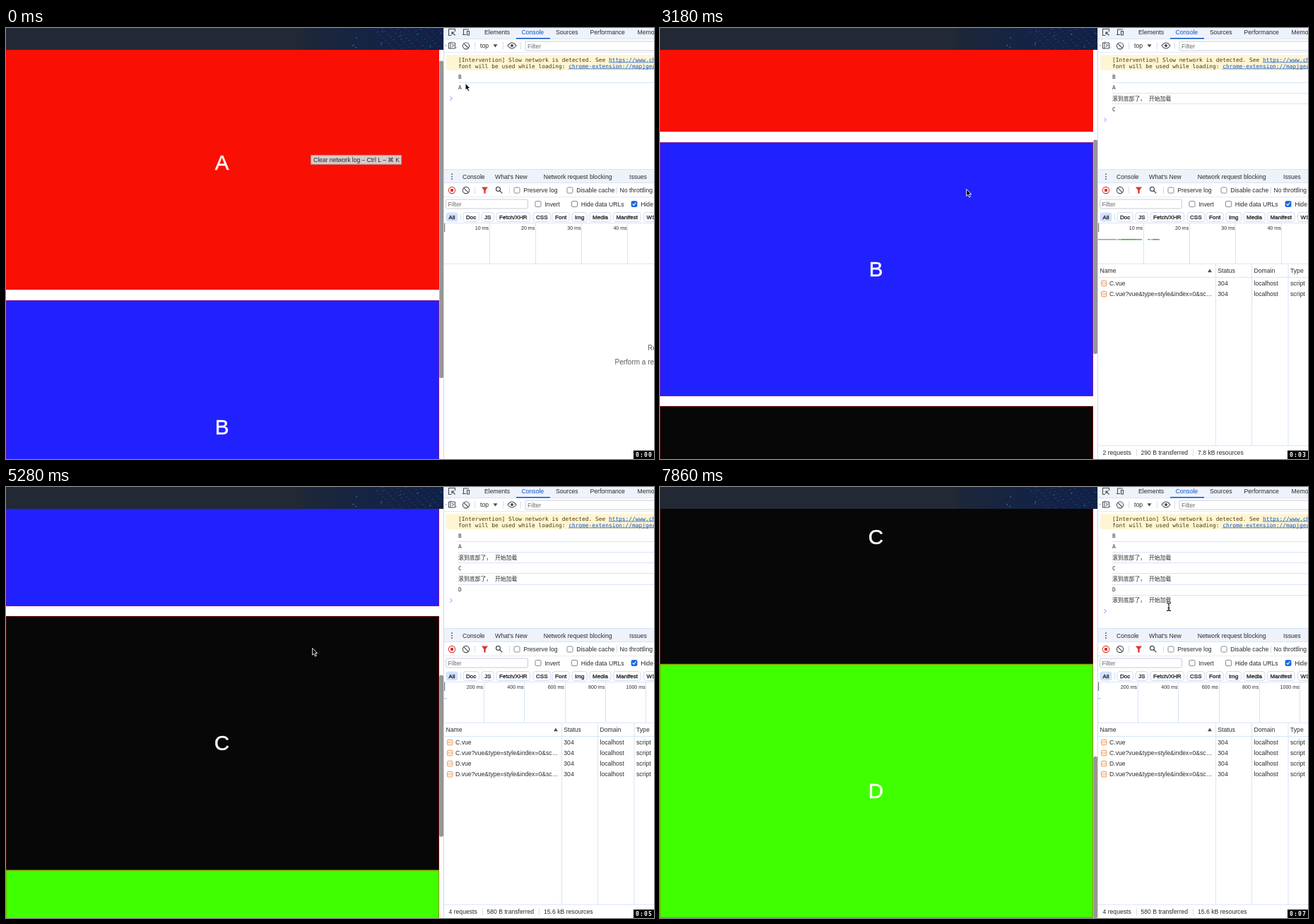
An HTML page with a canvas for the animation above (8000 ms loop, 917 px wide and 611 px high).

```html
<!DOCTYPE html>
<html lang="en">
<head>
<meta charset="utf-8">
<style>
  html, body { margin: 0; width: 100%; height: 100%; overflow: hidden; background: #fff; }
  canvas { display: block; }
</style>
</head>
<body>
<canvas id="stage" width="917" height="611"></canvas>
<script>
const W = 917, H = 611, LOOP = 8000, TICK = 150.7;
const g = document.getElementById('stage').getContext('2d');
const SANS = '"Liberation Sans", Arial, sans-serif';
const MONO = '"DejaVu Sans Mono", "Noto Sans CJK SC", "Noto Sans CJK", monospace';
const INK = '#2a2b2e', RULE = '#d8e4f7', ICON = '#494c50', RED = '#dc362e', LINK = '#1155cc';

// Keys are in screen ticks: [tick, value...]
const SCROLL = [[8, 0], [10, 42], [12, 42], [17, 148], [19, 148], [24, 339], [26, 415],
  [30, 456], [31, 456], [33, 509], [34, 509], [38, 779], [41, 869]];
const POINTER = [[0, 649.4, 78], [2, 610, 57], [7, 433, 228], [44, 433, 228], [51, 657, 380]];
const C_LOADED = 19, D_LOADED = 34;
const BOTTOM = '滚到底部了， 开始加载';
const LOG = [[0, 'B'], [0, 'A'], [18, BOTTOM], [C_LOADED, 'C'], [33, BOTTOM], [D_LOADED, 'D'], [41, BOTTOM]];
const BLOCKS = [['A', '#fa0f05', 11, 0], ['B', '#2121ff', 386, 0],
  ['C', '#070707', 760, C_LOADED], ['D', '#40ff00', 1120, D_LOADED]];

function sample(keys, tick, i = 1) {
  const next = keys.findIndex(k => k[0] > tick);
  if (next === 0) return keys[0][i];
  if (next < 0) return keys[keys.length - 1][i];
  const a = keys[next - 1], b = keys[next];
  return a[i] + (b[i] - a[i]) * (tick - a[0]) / (b[0] - a[0]);
}

function rect(x, y, w, h, color) {
  g.fillStyle = color;
  g.fillRect(x, y, w, h);
}

function round(x, y, w, h, r, fill, stroke) {
  g.beginPath();
  g.roundRect(x, y, w, h, r);
  if (fill) { g.fillStyle = fill; g.fill(); }
  if (stroke) { g.strokeStyle = stroke; g.lineWidth = 0.8; g.stroke(); }
}

// y is the middle of the capitals; returns the right edge
function text(s, x, y, { color = INK, size = 8.65, font = SANS, weight = '', align = 'left', bold = 0 } = {}) {
  g.font = `${weight} ${size}px ${font}`;
  g.fillStyle = g.strokeStyle = color;
  g.textAlign = align;
  g.fillText(s, x, y + size * 0.36);
  if (bold) {
    g.lineWidth = bold;
    g.strokeText(s, x, y + size * 0.36);
  }
  return x + g.measureText(s).width;
}

function path(d, x, y, stroke, fill, width = 1) {
  g.save();
  g.translate(x, y);
  const p = new Path2D(d);
  if (fill) { g.fillStyle = fill; g.fill(p); }
  if (stroke) { g.strokeStyle = stroke; g.lineWidth = width; g.stroke(p); }
  g.restore();
}

const hline = (x, y, color = RULE) => rect(x, y, W - x, 1, color);
const divider = (x, y) => rect(x, y - 5, 0.8, 10, '#c9d6ec');

function checkbox(x, y, label, on) {
  round(x - 4, y - 4, 8, 8, 1.5, on ? '#1a66e0' : '#fff', on ? '#1a66e0' : '#6b6e73');
  if (on) path('M-2.3 0L-.6 1.8L2.4-2', x, y, '#fff', null, 1.2);
  text(label, x + 9.2, y);
}

function input(x, y, w) {
  round(x, y, w, 13, 2, '#fff', '#bcc0c8');
  text('Filter', x + 3, y + 6.8, { color: '#6a6d72' });
}

function clearIcon(x, y) {
  path('M-4.6 0a4.6 4.6 0 1 0 9.2 0a4.6 4.6 0 1 0-9.2 0M-3.2-3.2L3.2 3.2', x, y, ICON, null, 1.1);
}

function banner() {
  rect(0, 0, 619, 31, '#222934');
  const night = g.createLinearGradient(420, 0, 619, 0);
  night.addColorStop(0, '#1c2738');
  night.addColorStop(0.5, '#152344');
  night.addColorStop(1, '#112045');
  rect(420, 0, 199, 31, night);
  let seed = 7;
  const rnd = () => (seed = seed * 16807 % 2147483647) / 2147483647;
  for (let i = 0; i < 72; i++) {
    const row = Math.floor(i / 8), k = i % 8;
    g.globalAlpha = 0.12 + rnd() * 0.3;
    rect(520 + row * 11 + k * 4, 1 + k * 4 - row % 3, Math.min(3, 6 - k / 2), 1.5, '#2858b8');
  }
  for (let i = 0; i < 10; i++) {
    g.globalAlpha = 0.4 + rnd() * 0.4;
    rect(475 + rnd() * 140, rnd() * 29, 1.6, 1.6, '#2f9ad0');
  }
  g.globalAlpha = 1;
}

function page(tick) {
  const s = Math.round(sample(SCROLL, tick));
  rect(0, 0, 620, H, '#fff');
  for (const [name, color, top, since] of BLOCKS) {
    if (tick < since) continue;
    const y = top - s;
    rect(0, y, 613, 360, color);
    g.strokeStyle = 'rgba(245, 15, 25, 0.55)';
    g.lineWidth = 0.8;
    g.strokeRect(0.1, y + 0.3, 612.5, 359.4);
    text(name, 305.5, y + 179.5, { color: '#fff', size: 29.5, align: 'center', bold: 0.5 });
  }
  banner();
  const view = 580, total = tick < C_LOADED ? 748 : tick < D_LOADED ? 1109 : 1469;
  round(613.3, 31 + (s + 20) * view / total, 5.7, view * view / total, 2, '#969696');
  rect(619, 0, 1, H, '#cdd9ec');
}

function consolePanel(tick) {
  rect(620, 0, 297, 15, '#eef2fb');
  hline(620, 15);
  path('M4.5-1V-4.5H-4.5V4.5H-1', 631, 6, ICON, null, 1.1);
  path('M4.5 4.5L0 0M0 3.5V0H3.5', 631, 6, ICON, null, 1.2);
  path('M4-4H-3.5V3M-5 3.5H0M1.5-1.5H4.5V4H1.5Z', 651, 6, ICON, null, 1.1);
  [['Elements', 677], ['Sources', 778], ['Performance', 826.5], ['Memory', 893.5]]
    .forEach(([s, x]) => text(s, x, 5.6));
  text('Console', 729.5, 5.6, { color: '#0b57d0' });
  rect(722, 14, 48, 1.5, '#0b57d0');

  path('M-4.5-4H4.5V4H-4.5ZM-2-4V4M0-2L2.5 0L0 2', 631, 25, ICON);
  clearIcon(651, 25.3);
  [663, 703, 728].forEach(x => divider(x, 25));
  text('top', 671, 25);
  path('M-3-1.8H3L0 2.4Z', 692.5, 25, null, ICON);
  path('M-6 0Q0-8 6 0Q0 8-6 0Z', 716, 25, ICON, null, 1.1);
  path('M-2 0a2 2 0 1 0 4 0a2 2 0 1 0-4 0', 716, 25, null, ICON);
  input(735, 19, 190);
  hline(620, 34, '#e3ebf8');

  const warn = { color: '#4a3a10', size: 7.87, font: MONO };
  const link = (s, x, y) => {
    const end = text(s, x, y, { ...warn, color: LINK });
    rect(x, y + 3.5, end - x, 0.7, LINK);
  };
  round(623, 38, 300, 22, 3, '#fef5d3');
  link('https://www.chromestatus.com', text('[Intervention] Slow network is detected. See ', 640, 45, warn), 45);
  link('chrome-extension://mapjgea', text('font will be used while loading: ', 640, 54, warn), 54);

  const lines = LOG.filter(l => tick >= l[0]);
  lines.forEach(([, s], i) => {
    const y = 69 + 15.2 * i;
    text(s, 640, y + 0.3, { size: 7.87, font: MONO });
    if (i) hline(640, Math.round(y - 7.4));
  });
  path('M-1.5-2.8L1.3 0L-1.5 2.8', 630, 69.5 + 15.2 * lines.length, '#5f8ff0', null, 1);
}

function networkTools() {
  rect(620, 201, 297, 19, '#eef2fb');
  hline(620, 200);
  hline(620, 219);
  [-3.5, 0, 3.5].forEach(d => rect(630.2, 209.8 + d, 1.6, 1.6, ICON));
  [['Console', 646], ["What's New", 692], ['Network request blocking', 760.7], ['Issues', 882]]
    .forEach(([s, x]) => text(s, x, 210.6));

  path('M-4.6 0a4.6 4.6 0 1 0 9.2 0a4.6 4.6 0 1 0-9.2 0', 631, 230, RED, null, 1.1);
  rect(629, 228, 4, 4, RED);
  clearIcon(651, 230);
  [663, 712, 864].forEach(x => divider(x, 230));
  path('M-4.5-4.5H4.5L1.2 0V4.5H-1.2V0Z', 677.5, 230, null, RED);
  path('M-4-1.3a3 3 0 1 0 6 0a3 3 0 1 0-6 0M1.2 1L4.8 4.6', 697.5, 229.6, ICON, null, 1.3);
  checkbox(723, 230, 'Preserve log');
  checkbox(798, 230, 'Disable cache');
  text('No throttling', 868.5, 230);
  hline(620, 239, '#e3ebf8');

  input(622.5, 243, 116);
  checkbox(753, 249.5, 'Invert');
  checkbox(804.5, 249.5, 'Hide data URLs');
  checkbox(889, 249.5, 'Hide extension URLs', true);

  const chips = { All: 626.5, Doc: 651, JS: 677, 'Fetch/XHR': 698, CSS: 750, Font: 777,
    Img: 805, Media: 830, Manifest: 863.5, WS: 906.5 };
  const style = { size: 8.1, bold: 0.35 };
  for (const [s, x] of Object.entries(chips)) {
    const end = text(s, x, 268, style), all = s === 'All';
    round(x - 4, 261.5, end - x + 8, 13, 3.5, all ? '#d3e3fd' : '#fff', all ? null : '#c3d3ee');
    text(s, x, 268, style);
  }
  divider(643, 268);
  hline(620, 276);
}

function timeline(tick) {
  const [first, pitch, unit] = tick < D_LOADED ? [684.3, 65.2, 10] : [676.3, 57.4, 200];
  for (let i = 0; i < 5; i++) {
    const x = first + pitch * i;
    rect(Math.floor(x), 277, 1, 57, RULE);
    text(`${unit * (i + 1)} ms`, x - 1.2, 283.5, { size: 7.1, align: 'right' });
  }
  rect(620, 277, 1.2, 12, '#777b82');
  hline(620, 333.7);
  const [gray, orange, green, teal] = ['#a3a3a3', '#e59a35', '#34b44a', '#35b5c5'];
  if (tick >= D_LOADED) rect(620, 299.2, 4, 1.2, '#9bd3ea');
  else if (tick >= C_LOADED) {
    [[620, 26, gray], [647, 6, orange], [653, 20, green], [673, 9, teal],
      [690, 4, gray], [695, 3, orange], [698, 6, green], [704, 3, teal]]
      .forEach(([x, w, c]) => rect(x, 299, w, 1.6, c));
  }
}

function requests(tick) {
  if (tick < C_LOADED) {
    const hint = { color: '#5a5d63', size: 10 };
    text('Recording network activity…', 908, 453, hint);
    text('Perform a request or hit ⌘ R', 861.5, 473, hint);
    return;
  }
  const cells = (y, ...names) => names.forEach((s, i) => text(s, [789.3, 840.5, 892][i], y));
  text('Name', 622.5, 344);
  path('M-3 2.2H3L0-2.4Z', 778, 344, null, ICON);
  cells(344, 'Status', 'Domain', 'Type');
  hline(620, 353);
  [786, 837, 888.5].forEach(x => rect(x, 335, 1, 257, RULE));
  const files = tick < D_LOADED ? ['C'] : ['C', 'D'];
  files.flatMap(f => [f + '.vue', f + '.vue?vue&type=style&index=0&sc…']).forEach((s, i) => {
    const y = 362 + 15.1 * i;
    round(624.5, y - 3.7, 7.4, 7.4, 1, '#fff5ea', '#e8812c');
    path('M-.8-1.5L-2.2 0L-.8 1.5M.8-1.5L2.2 0L.8 1.5', 628.2, y, '#e8812c', null, 0.8);
    text(s, 636, y);
    cells(y, '304', 'localhost', 'script');
  });
  hline(620, 591.5);
  const sums = tick < D_LOADED ? ['2 requests', '290 B transferred', '7.8 kB resources']
    : ['4 requests', '580 B transferred', '15.6 kB resources'];
  sums.forEach((s, i) => text(s, [626.5, 680.5, 761][i], 601.7));
  divider(674, 602);
  divider(754, 602);
}

function clock(t) {
  const seconds = Math.min(7, Math.floor((t + 60) / 1000));
  rect(888, 599, 29, 12, '#000');
  g.letterSpacing = '1.2px';
  text('0:0' + seconds, 891, 605, { color: '#fff', size: 8, font: MONO, weight: 'bold' });
  g.letterSpacing = '0px';
}

function pointer(tick) {
  if (tick > 51) {
    path('M-3-5.5Q0-5.5 0-3.5Q0-5.5 3-5.5M0-3.5V3.5M-3 5.5Q0 5.5 0 3.5Q0 5.5 3 5.5M-1.5 1.5H1.5',
      720, 170, '#111', null, 1.1);
    return;
  }
  path('M.7.5V10.2L2.9 8.2L4.5 12L6.3 11.2L4.7 7.6H7.6Z',
    sample(POINTER, tick, 1), sample(POINTER, tick, 2), '#fff', '#000', 0.9);
}

function draw(t) {
  const tick = Math.floor((t + 10) / TICK);
  rect(0, 0, W, H, '#fff');
  page(tick);
  consolePanel(tick);
  networkTools();
  timeline(tick);
  requests(tick);
  if (tick < 2) {
    round(431.5, 180.3, 128, 13, 0, '#d6cccb', '#a89694');
    text('Clear network log – Ctrl L – ⌘ K', 435, 186.7, { size: 8.5, color: '#2b2626' });
  }
  clock(t);
  pointer(tick);
}

const start = performance.now();
function loop() {
  draw((performance.now() - start) % LOOP);
  requestAnimationFrame(loop);
}
loop();
</script>
</body>
</html>
```
